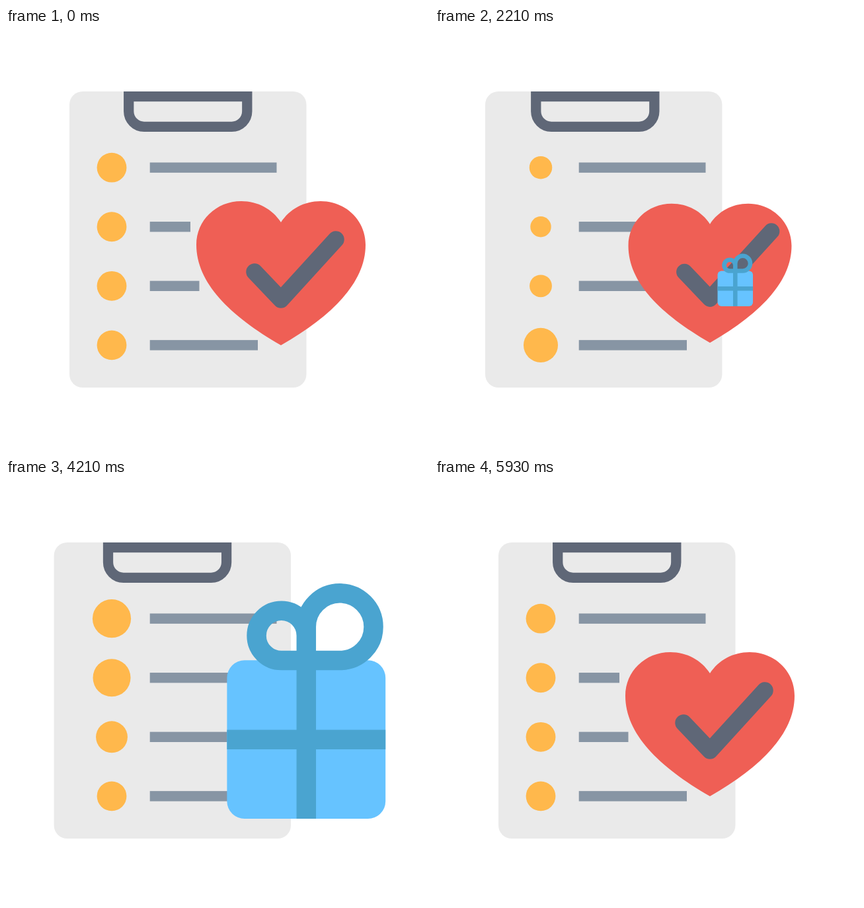
Write an HTML page that moves like this. It is 640 px wide and 640 px high and loops after 6 s.

```html
<!DOCTYPE html>
<html lang="en">
<head>
<meta charset="utf-8">
<title>Wish list</title>
<style>
html, body { margin: 0; width: 100%; height: 100%; overflow: hidden; background: #fff; }
svg { display: block; width: 100%; height: 100%; }
</style>
</head>
<body>
<svg viewBox="0 0 640 640">
  <rect id="board" x="96" y="96" width="358.5" height="448" rx="20" fill="#eaeaea"/>
  <path id="clip" fill="none" stroke="#5f6777" stroke-width="15.3"
    d="M185.7 103.7H364.8V126a23.3 23.3 0 0 1-23.3 23.3H209a23.3 23.3 0 0 1-23.3-23.3Z"/>
  <g id="rows"></g>
  <g id="heart">
    <path fill="#ef5f55" d="M0-77C-13-97-35-109-60-109C-98-109-128-80-128-43C-128 14-78 64 0 109C78 64 128 14 128-43C128-80 98-109 60-109C35-109 13-97 0-77Z"/>
    <path id="check" fill="none" stroke="#5f6777" stroke-width="25.5" stroke-linecap="round" stroke-linejoin="round"/>
  </g>
  <g id="gift">
    <rect x="-107.75" y="-107.75" width="215.5" height="215.5" rx="24" fill="#66c3ff"/>
    <path fill="none" stroke="#4aa4d0" stroke-width="26.5"
      d="M-107.75 0H107.75M0 107.75V-107.5M0-107.5H-33.8a33.8 33.8 0 1 1 33.8-33.8ZM0-107.5H45.7a45.7 45.7 0 1 0-45.7-45.7Z"/>
  </g>
  <g id="star">
    <circle r="78.7" fill="#ffd966"/>
    <polygon id="points" fill="#f15f56"/>
  </g>
</svg>
<script>
const $ = id => document.getElementById(id);
const LOOP = 6000;
const ease = p => p < .5 ? 4 * p ** 3 : 1 - 4 * (1 - p) ** 3;

// Value at time t on a track of [time, value] keys
function track(keys, t) {
  let [t0, v0] = keys[0];
  for (const [t1, v1] of keys) {
    if (t < t1) return t <= t0 ? v0 : v0 + (v1 - v0) * ease((t - t0) / (t1 - t0));
    [t0, v0] = [t1, v1];
  }
  return v0;
}

// From rest to a, then to -a, then back to rest
const swing = (start, a, t) =>
  track([[start, 0], [start + 600, a], [start + 1200, -a], [start + 1800, 0]], t);

const shake = (start, a, t) =>
  track([[start, 0], [start + 203, a], [start + 406, -a], [start + 609, a], [start + 812, 0]], t);

const sway = (a, t) => swing(780, a, t) + swing(3786, -a, t);

const heartSize = [[0, 1], [780, 1], [1380, .75], [1980, 1.25], [2580, 0], [4986, 0], [5586, 1.2], [5940, 1]];
const checkArm = [[780, 1], [1380, .645], [1980, 1.21], [2580, 1]];
const giftSize = [[1980, 0], [2580, 1.25], [3180, 1], [3786, 1], [4386, 1.31], [4680, 0]];
const starSize = [[4386, 0], [4986, 1], [5586, 0]];

const lineEnds = [
  [[2280, 409.5], [2580, 362], [3180, 409.5]],
  ...[[279, 319.5], [292.5, 323.4], [381, 381]].map(([rest, wide]) => [
    [780, rest], [1380, wide], [2280, wide], [2580, 327], [3180, 355.5],
    [3786, 355.5], [4386, 409.5], [4610, 409.5], [5210, rest]
  ])
];

function add(parent, tag, attrs) {
  const el = document.createElementNS('http://www.w3.org/2000/svg', tag);
  for (const k in attrs) el.setAttribute(k, attrs[k]);
  return parent.appendChild(el);
}

const rows = lineEnds.map((keys, i) => {
  const y = 211.2 + 89.55 * i;
  return {
    keys,
    dot: add($('rows'), 'circle', { cx: 160, cy: y, fill: '#ffb84c' }),
    line: add($('rows'), 'rect', { x: 217.7, y: y - 7.7, height: 15.4, fill: '#8795a4' })
  };
});

$('points').setAttribute('points', Array.from({ length: 10 }, (_, i) => {
  const r = i % 2 ? 60.5 : 120.6, a = i * Math.PI / 5;
  return [r * Math.sin(a), 2.5 - r * Math.cos(a)];
}).join(' '));

const place = (id, x, y, size, angle = 0) =>
  $(id).setAttribute('transform', `translate(${x} ${y}) rotate(${angle}) scale(${size})`);

function draw(t) {
  place('board', sway(26, t), 0, 1);
  place('clip', sway(38, t - 38), 0, 1);

  rows.forEach(({ keys, dot, line }, i) => {
    const delay = 200 * i;
    dot.setAttribute('r', 22.4 + swing(780 + delay, 6.7, t) + swing(3580 + delay, 6.7, t));
    line.setAttribute('width', track(keys, t) - 217.7);
  });

  const arm = track(checkArm, t);
  $('check').setAttribute('d', `M-40-2L0 40L${83 * arm} ${40 - 91 * arm}`);
  place('heart', 416, 371, track(heartSize, t), shake(0, 10, t));
  place('gift', 454.3, 394.2, .87 * track(giftSize, t), shake(3000, -10, t));
  place('star', 454.5, 371.5, track(starSize, t));
}

const begin = performance.now();
function tick() {
  draw((performance.now() - begin) % LOOP);
  requestAnimationFrame(tick);
}
tick();
</script>
</body>
</html>
```
